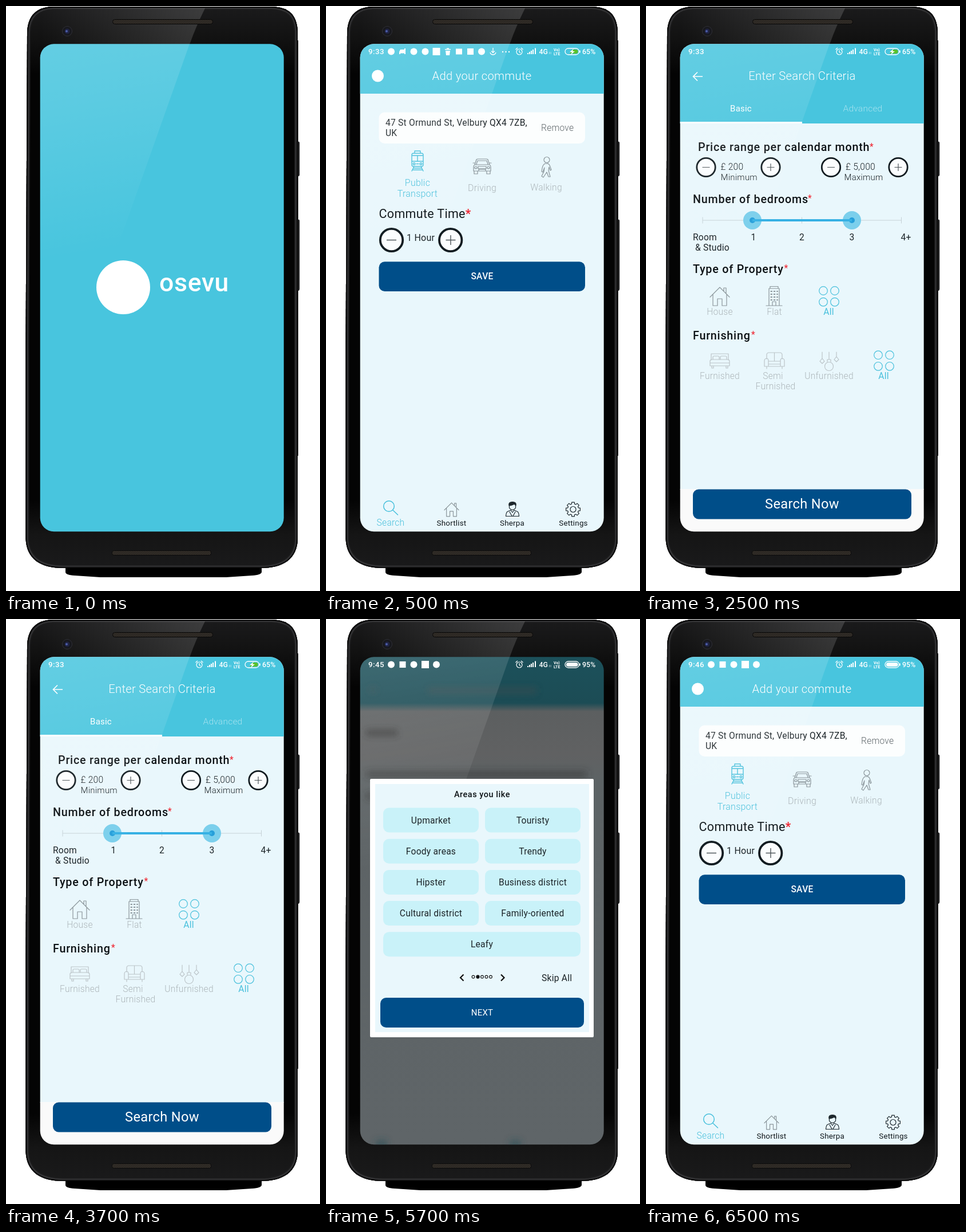
An HTML page that plays this animation: 549 by 1021 pixels, repeating every 8 s.

```html
<!DOCTYPE html>
<html lang="en">
<head>
<meta charset="utf-8">
<title>Home search app walkthrough</title>
<style>
html, body { margin: 0; width: 100%; height: 100%; overflow: hidden; background: #fff; }
svg { display: block; width: 549px; height: 1021px; }
text { font-family: Roboto, Inter, sans-serif; font-size: 15.6px; letter-spacing: .015em; fill: #1c2428; }
.m { text-anchor: middle; }
.light { font-weight: 300; }
.title { font-size: 20.2px; font-weight: 300; fill: #fff; }
.head { font-size: 19.7px; font-weight: 500; letter-spacing: .04em; fill: #0c1114; }
.nav { font-size: 13.4px; fill: #10171b; }
.faint { fill: #adb6ba; font-weight: 300; }
.teal { fill: #48c0dc; }
.white { fill: #fff; }
.red { fill: #f0202c; }
.status { font-size: 12.3px; font-weight: 500; fill: #fff; letter-spacing: .01em; }
.clock { font-size: 13.2px; font-weight: 500; fill: #fff; letter-spacing: .04em; }
.tiny { font-size: 6.8px; font-weight: 700; fill: #fff; }
.ico { fill: none; stroke-width: 1.2; stroke-linecap: round; stroke-linejoin: round; }
.gray { stroke: #8b969b; }
.pale { stroke: #bcc5c9; }
.cyan { stroke: #48c0dc; }
.dark { stroke: #1d272c; }

/* hard cuts between screens */
.scene { visibility: hidden; animation: 8s step-end infinite; }
.splash { animation-name: splash; }
.commute { animation-name: commute; }
.early { animation-name: early; }
.criteria { animation-name: criteria; }
.areas { animation-name: areas; }
.late { animation-name: late; }
@keyframes splash { 0% { visibility: visible } 6.25%, 100% { visibility: hidden } }
@keyframes commute { 0%, 31.25% { visibility: hidden } 6.25%, 81.25%, 100% { visibility: visible } }
@keyframes early { 0%, 31.25%, 100% { visibility: hidden } 6.25% { visibility: visible } }
@keyframes criteria { 0%, 56.25%, 100% { visibility: hidden } 31.25% { visibility: visible } }
@keyframes areas { 0%, 81.25%, 100% { visibility: hidden } 56.25% { visibility: visible } }
@keyframes late { 0% { visibility: hidden } 81.25%, 100% { visibility: visible } }
</style>
</head>
<body>
<svg viewBox="0 0 549 1021">
<defs>
  <linearGradient id="shell" x2="0" y2="1">
    <stop offset="0" stop-color="#1b1b1c"/><stop offset=".06" stop-color="#111"/>
    <stop offset=".12" stop-color="#040404"/><stop offset=".88" stop-color="#040404"/>
    <stop offset=".94" stop-color="#151515"/><stop offset="1" stop-color="#1a1a1b"/>
  </linearGradient>
  <linearGradient id="shine" gradientUnits="userSpaceOnUse" x1="120" y1="20" x2="190" y2="425">
    <stop offset="0" stop-color="#fff" stop-opacity=".16"/><stop offset=".35" stop-color="#fff" stop-opacity=".11"/>
    <stop offset="1" stop-color="#fff" stop-opacity="0"/>
  </linearGradient>
  <linearGradient id="edge-shine" gradientUnits="userSpaceOnUse" x1="60" y1="0" x2="345" y2="0">
    <stop offset="0" stop-color="#fff" stop-opacity="0"/><stop offset="1" stop-color="#fff" stop-opacity=".15"/>
  </linearGradient>
  <linearGradient id="dim" gradientUnits="userSpaceOnUse" x1="0" y1="66" x2="0" y2="917">
    <stop offset="0" stop-color="#1c515b"/><stop offset=".095" stop-color="#1c4c55"/>
    <stop offset=".112" stop-color="#5c5f60"/><stop offset=".2" stop-color="#606162"/>
    <stop offset=".25" stop-color="#5d6365"/><stop offset="1" stop-color="#5f6568"/>
  </linearGradient>
  <filter id="blur" x="-30%" y="-150%" width="160%" height="400%"><feGaussianBlur stdDeviation="6"/></filter>
  <path id="body" d="M82 1H464C494 2 508 14 510 44V930C509 965 485 981 445 981H100C60 981 36 965 34.500 930V590L37 46C38 16 54 2 82 1Z"/>
  <clipPath id="shape"><use href="#body"/></clipPath>
  <clipPath id="screen"><rect x="59.700" y="66.300" width="426" height="851" rx="24"/></clipPath>
  <pattern id="mesh" width="3" height="3" patternUnits="userSpaceOnUse">
    <rect width="3" height="3" fill="#37322c"/><path d="M0 3L3 0" stroke="#1c1916"/>
  </pattern>

  <g id="minus"><circle r="16.2" fill="#fbfdfe" stroke="#111b20" stroke-width="2.8"/><path d="M-6.5 0H6.5" stroke="#4d5559" stroke-width="1.2"/></g>
  <g id="plus"><use href="#minus"/><path d="M0-6.5V6.5" stroke="#4d5559" stroke-width="1.2"/></g>
  <path id="house" d="M-17 1L0-16L17 1M-12-3V16H-4V4H4V16H12V-3M7-10V-15H11V-5"/>
  <g id="four" class="ico cyan"><circle cx="-10" cy="-9.8" r="7.3"/><circle cx="10" cy="-9.8" r="7.3"/><circle cx="-10" cy="9.8" r="7.3"/><circle cx="10" cy="9.8" r="7.3"/></g>
  <g id="knob"><circle r="16" fill="#7bcfec"/><circle r="5" fill="#269fda"/></g>
  <g id="phone-state">
    <g fill="none" stroke="#fff" stroke-width="1.2">
      <circle cx="338" cy="80" r="5"/><path d="M338 77V80L340 82M331.5 76L335 73M341 73L344.500 76"/>
      <path d="M353 84V82M356 84V80M359 84V78M362 84V76M366 84V73.500" stroke-width="2"/>
    </g>
    <text x="372.500" y="84" class="status">4G</text>
    <path d="M390.500 84V80M393 80V84" stroke="#fff" stroke-width=".8" opacity=".7"/>
    <text class="tiny" x="398" y="78.500">Vo)</text><text class="tiny" x="398" y="86">LTE</text>
    <rect x="418" y="74" width="24.500" height="11" rx="5.500" fill="none" stroke="#fff" stroke-width="1.3"/>
    <path d="M444 77.500V81.500" stroke="#fff" stroke-width="1.5"/>
  </g>
  <g id="charging">
    <use href="#phone-state"/>
    <path d="M430 76H437a3.500 3.500 0 0 1 0 7H426Z" fill="#5ac02a"/>
    <path d="M433 74.500L426 80.500H430L428 85L435 79H431Z" fill="#fff"/>
    <text x="448" y="84" class="status">65%</text>
  </g>
  <g id="charged">
    <use href="#phone-state"/><rect x="420" y="76" width="20.500" height="7" rx="3.500" fill="#fff"/>
    <text x="448" y="84" class="status">95%</text>
  </g>
  <g id="notices" fill="#fff">
    <circle cx="114" cy="79.500" r="6"/><rect x="128.500" y="74" width="11" height="11"/>
    <circle cx="153.500" cy="79.500" r="6"/><rect x="167" y="73" width="13" height="13"/><circle cx="193" cy="79.500" r="6"/>
  </g>
</defs>

<!-- handset -->
<path d="M104 975H447V988Q446 993 430 994L385 997H165L120 994Q104 993 104 988Z"/>
<path d="M510 237H512Q513 237 513 239V295Q513 297 510 297M510 373H512Q513 373 513 375V494Q513 497 510 497" fill="#1b1b1c" stroke="#353537" stroke-width=".7"/>
<rect x="509" y="60" width="2" height="725" fill="#1c1c1d"/>
<use href="#body" fill="url(#shell)"/>
<g clip-path="url(#shape)" fill="none">
  <use href="#body" stroke="#1c1c1d" stroke-width="12"/>
  <use href="#body" stroke="#3b3b3d" stroke-width="8"/>
  <use href="#body" stroke="#1a1a1b" stroke-width="5.500"/>
  <use href="#body" stroke="#050505" stroke-width="2"/>
</g>
<path d="M60 4H348Q332 36 321 67H60Z" fill="url(#edge-shine)"/>
<rect x="186.500" y="23.500" width="175" height="8" rx="4" fill="url(#mesh)" stroke="#070707"/>
<rect x="185.500" y="950.500" width="173" height="8" rx="3" fill="url(#mesh)" stroke="#0b0b0b"/>
<circle cx="107" cy="44" r="8.500" fill="#17181d" stroke="#303036"/>
<circle cx="107" cy="44" r="4.500" fill="#202444"/><circle cx="106" cy="44" r="2" fill="#4c5da8"/>

<g clip-path="url(#screen)">
  <g class="scene splash">
    <rect x="59" y="66" width="428" height="852" fill="#48c5de"/>
    <circle cx="205" cy="491" r="47" fill="#fff"/>
    <text x="268" y="498" class="white" style="font-size:44.5px;font-weight:500">osevu</text>
  </g>

  <g class="scene commute">
    <rect x="59" y="66" width="428" height="852" fill="#e9f7fc"/>
    <rect x="59" y="66" width="428" height="87" fill="#48c5de"/>
    <circle cx="90.500" cy="122" r="10.500" fill="#fff"/>
    <text x="272.500" y="129" class="title m">Add your commute</text>
    <rect x="92.500" y="185.500" width="360.500" height="54.500" rx="10" fill="#fcfefe"/>
    <text x="104" y="209">47 St Ormund St, Velbury QX4 7ZB,</text>
    <text x="104" y="227">UK</text>
    <text x="376" y="218" class="light" style="fill:#5f676b">Remove</text>

    <g class="ico cyan" style="stroke-width:1.4">
      <path d="M153 257H167Q170 257 170 260V277Q170 280 167 280H153Q150 280 150 277V260Q150 257 153 257ZM155 257V253H165V257M150 261H170M150 271H170M160 261V271M154 280L150 288M166 280L170 288M153 283H167M152 286H168"/>
      <circle cx="154" cy="275.500" r="1.800"/><circle cx="166" cy="275.500" r="1.800"/><path d="M158 275.500H162"/>
    </g>
    <g class="ico gray">
      <path d="M260 277L263 268Q264 267 266 267H280Q282 267 283 268L286 277M260 277H286Q288 278 288 281V288H258V281Q258 278 260 277ZM259 288V293H265V288M281 288V293H287V288M257 274H260M286 274H289M263 276L265 270H281L283 276M266 280H280V284H266ZM267 288V285H279V288"/>
      <circle cx="262" cy="282" r="2"/><circle cx="284" cy="282" r="2"/>
      <circle cx="386" cy="268.500" r="5"/>
      <path d="M383 275Q379 277 378 283L377 289L379 290L382 282L381 289L377 297L380 299L386 290L389 298H392L389 287L390 281L392 287L394 286L391 278Q389 274 386 275Z"/>
    </g>
    <g class="m">
      <text x="160" y="314" class="light teal" style="font-size:16px">Public</text>
      <text x="160" y="333" class="light teal" style="font-size:16px">Transport</text>
      <text x="273" y="323" class="faint" style="font-size:16px">Driving</text>
      <text x="385" y="322" class="faint">Walking</text>
    </g>
    <text x="92.500" y="370" style="font-size:21.5px;fill:#11181c">Commute Time<tspan class="red" font-weight="500">*</tspan></text>
    <g fill="#fbfdfe" stroke="#111b20" stroke-width="3.800"><circle cx="114.500" cy="408.500" r="19.700"/><circle cx="217.700" cy="408.500" r="19.700"/></g>
    <path d="M106 408.500H123M209.500 408.500H226.500M218 400V417" stroke="#4d5559" stroke-width="1.4"/>
    <text x="141" y="410" style="font-size:16px">1 Hour</text>
    <rect x="92.500" y="446.300" width="360.500" height="51.700" rx="10" fill="#004e89"/>
    <text x="273" y="477" class="m white" font-weight="500">SAVE</text>

    <g class="ico cyan" style="stroke-width:1.5"><circle cx="110" cy="873" r="9.300"/><path d="M117 880L125.500 888"/></g>
    <use href="#house" class="ico gray" style="stroke-width:1.6" transform="translate(219.500 879) scale(.74)"/>
    <g class="ico dark">
      <path d="M320.500 872V876Q326 883 331.500 876V872M323 880L317 882.500Q315 884 314.500 890.500H337.500Q337 884 335 882.500L329 880M323 880L326 884L329 880M321 883L325 890M331 883L327 890"/>
      <path d="M320 872Q318.500 865.500 326 865.500Q333.500 865.500 332 872L329 869Q326 871.500 320 872Z" fill="#1d272c"/>
      <circle cx="432" cy="878.500" r="5"/>
      <path id="gear"/>
    </g>
    <g class="m">
      <text x="113" y="906.500" class="light teal">Search</text>
      <text x="219.500" y="906.500" class="nav">Shortlist</text>
      <text x="325.500" y="906.500" class="nav">Sherpa</text>
      <text x="432.500" y="906.500" class="nav">Settings</text>
    </g>
  </g>

  <g class="scene early">
    <text x="74" y="84" class="clock">9:33</text>
    <g fill="#fff">
      <circle cx="114" cy="79.500" r="6"/>
      <path d="M128 80L130 76H137V74H139V80L139 84H137V82.500H130V84H128Z"/>
      <circle cx="153.500" cy="79.500" r="6"/><circle cx="173.500" cy="79.500" r="6"/>
      <rect x="186.500" y="73" width="13" height="13"/>
      <path d="M208 75H211V73.500H215V75H218V76.500H208ZM209 78H217L216 86H210Z"/>
      <rect x="227" y="74.500" width="11" height="10"/><rect x="247" y="74" width="11" height="11"/>
      <circle cx="272" cy="79.500" r="6"/>
      <circle cx="309" cy="80" r="1.200"/><circle cx="314.500" cy="80" r="1.200"/><circle cx="320" cy="80" r="1.200"/>
    </g>
    <path d="M292 73V81M289 78.500L292 81.500L295 78.500M287 81Q288 85 292 85Q296 85 297 81" fill="none" stroke="#fff" stroke-width="1.300"/>
    <use href="#charging"/>
  </g>

  <g class="scene late">
    <text x="74" y="84" class="clock">9:46</text>
    <use href="#notices"/><use href="#charged"/>
  </g>

  <g class="scene criteria">
    <rect x="59" y="66" width="428" height="778" fill="#e9f7fc"/>
    <rect x="59" y="843" width="428" height="75" fill="#fafafa"/>
    <rect x="59" y="66" width="428" height="139" fill="#48c5de"/>
    <rect x="59" y="202" width="214" height="3" fill="#fff"/>
    <text x="74" y="84" class="clock">9:33</text><use href="#charging"/>
    <path d="M99 123H83M90 115.500L82.500 123L90 130.500" fill="none" stroke="#fff" stroke-width="1.700"/>
    <text x="273" y="129" class="title m">Enter Search Criteria</text>
    <text x="166" y="184" class="m white" style="font-size:15px">Basic</text>
    <text x="379" y="184" class="m light" style="font-size:15.5px;fill:#a6e2ef">Advanced</text>

    <text x="91" y="253" class="head">Price range per calendar month</text>
    <text x="82" y="344" class="head">Number of bedrooms</text>
    <text x="82" y="466" class="head">Type of Property</text>
    <text x="82" y="581.500" class="head">Furnishing</text>
    <g style="font-size:15px"><text x="391" y="251" class="red">*</text><text x="283" y="341" class="red">*</text><text x="241.500" y="463" class="red">*</text><text x="184" y="579" class="red">*</text></g>
    <use href="#minus" x="105" y="281.500"/><use href="#plus" x="218" y="281.500"/>
    <use href="#minus" x="323.500" y="281.500"/><use href="#plus" x="441" y="281.500"/>
    <g class="light">
      <text x="130.500" y="286">£ 200</text><text x="130.500" y="304" style="font-size:15px">Minimum</text>
      <text x="349" y="286">£ 5,000</text><text x="346.500" y="304" style="font-size:15px">Maximum</text>
    </g>

    <path d="M99 374H446M99 368.500V379.500M272.500 368.500V379.500M446.500 368.500V379.500" fill="none" stroke="#c6d2d7"/>
    <use href="#knob" x="186" y="374"/><use href="#knob" x="360" y="374"/>
    <path d="M186 374H360" stroke="#36b1e4" stroke-width="4"/>
    <text x="82" y="408.500">Room</text><text x="86" y="426.500">&amp; Studio</text>
    <g class="m">
      <text x="188" y="408.500">1</text><text x="272.500" y="408.500">2</text><text x="360" y="408.500">3</text><text x="454.500" y="408.500">4+</text>
    </g>

    <use href="#house" class="ico gray" x="129" y="507"/>
    <g class="ico gray">
      <path d="M215 493H233V523H215ZM217 493V489.500H231V493M210 523H238M221 523V516H227V523"/>
      <path d="M218.500 498H230M218.500 503H230M218.500 508H230M218.500 513H230" stroke-width="2.200" stroke-dasharray="1.500 3.800"/>
    </g>
    <use href="#four" x="320" y="506.800"/>
    <g class="ico pale">
      <path d="M114 618V607H144V618M117 617V613Q117 611 119 611H126Q128 611 128 613V617M130 617V613Q130 611 132 611H139Q141 611 141 613V617M112 628V620Q112 617 115 617H143Q146 617 146 620V628ZM112 623H146M115 628V632H118V628M140 628V632H143V628"/>
      <path d="M211 616V609Q211 605 215 605H234Q238 605 238 609V616M224.500 605V620M214 629V619Q214 615 210.500 615Q207 616 207 619V629H242V619Q242 616 238.500 615Q235 615 235 619V629M214 620H235M214 625H235M211 629V633M238 629V633"/>
      <path d="M308 604V616M320 604V617M333 604V613M308 615L304 620L308 624L312 620ZM333 612L329 617L333 621L337 617ZM317 621V617H323V621"/>
      <circle cx="320" cy="629" r="7.500"/>
    </g>
    <use href="#four" x="416" y="619"/>
    <g class="m">
      <text x="129" y="539" class="faint">House</text><text x="224.500" y="539" class="faint">Flat</text><text x="319.500" y="539" class="teal">All</text>
      <text x="129" y="651" class="faint">Furnished</text><text x="222" y="651" class="faint">Semi</text><text x="226.500" y="669" class="faint">Furnished</text>
      <text x="320" y="651" class="faint">Unfurnished</text><text x="415.500" y="651" class="teal">All</text>
    </g>
    <rect x="82" y="843.500" width="382" height="52" rx="10" fill="#004e89"/>
    <text x="273" y="877" class="m white" style="font-size:23.6px">Search Now</text>
  </g>

  <g class="scene areas">
    <rect x="59" y="66" width="428" height="852" fill="url(#dim)"/>
    <g filter="url(#blur)">
      <rect x="178" y="120" width="190" height="10" fill="#3b4c50" opacity=".65"/>
      <rect x="75" y="117" width="14" height="13" fill="#3b4c50" opacity=".4"/>
      <rect x="70" y="193" width="55" height="11" fill="#333" opacity=".7"/>
      <rect x="70" y="265" width="386" height="12" fill="#333" opacity=".55"/>
      <rect x="70" y="303" width="60" height="12" fill="#333" opacity=".55"/>
      <path d="M88 910H106V922H88ZM322 910H340V922H322Z" fill="#274f58" opacity=".7"/>
    </g>
    <text x="74" y="84" class="clock">9:45</text><use href="#notices"/><use href="#charged"/>
  </g>

  <path d="M59 66H321L195 421L59 440Z" fill="url(#shine)"/>

  <g class="scene areas">
    <rect x="77" y="279" width="391" height="451" rx="2" fill="#fff"/>
    <rect x="86" y="288" width="374" height="433" fill="#e9f7fc"/>
    <text x="273" y="311" class="head m" style="font-size:14.4px">Areas you like</text>
    <g id="choices"></g>
    <path d="M240.500 620.500L235 626L240.500 631.500M306 620.500L311.500 626L306 631.500" fill="none" stroke="#111" stroke-width="2.200"/>
    <g fill="none" stroke="#111" stroke-width="1.100">
      <circle cx="257.500" cy="624.500" r="2.400"/><circle cx="265.500" cy="624.500" r="2.600" fill="#111"/><circle cx="273" cy="624.500" r="2.400"/><circle cx="280.500" cy="624.500" r="2.400"/><circle cx="288" cy="624.500" r="2.400"/>
    </g>
    <text x="377" y="631.500">Skip All</text>
    <rect x="95" y="661" width="356" height="52" rx="10" fill="#004e89"/>
    <text x="273" y="692" class="m white" style="font-size:15px">NEXT</text>
  </g>
</g>
</svg>
<script>
const labels = ["Upmarket", "Touristy", "Foody areas", "Trendy", "Hipster",
  "Business district", "Cultural district", "Family-oriented", "Leafy"];

document.getElementById("choices").innerHTML = labels.map((label, i) => {
  const x = i % 2 ? 278 : 100;
  const y = 329.5 + Math.floor(i / 2) * 54.2;
  const width = i === labels.length - 1 ? 345 : 167;
  return `<rect x="${x}" y="${y}" width="${width}" height="43" rx="10" fill="#c9f2f9"/>
    <text x="${x + width / 2}" y="${y + 27}" class="m">${label}</text>`;
}).join("");

// eight-toothed outline
const teeth = [];
for (let i = 0; i < 8; i++) {
  for (const [offset, radius] of [[-.27, 9.8], [-.18, 12.6], [.18, 12.6], [.27, 9.8]]) {
    const angle = i * Math.PI / 4 + offset;
    teeth.push(`${(432 + radius * Math.cos(angle)).toFixed(1)} ${(878.5 + radius * Math.sin(angle)).toFixed(1)}`);
  }
}
document.getElementById("gear").setAttribute("d", `M${teeth.join("L")}Z`);
</script>
</body>
</html>
```
